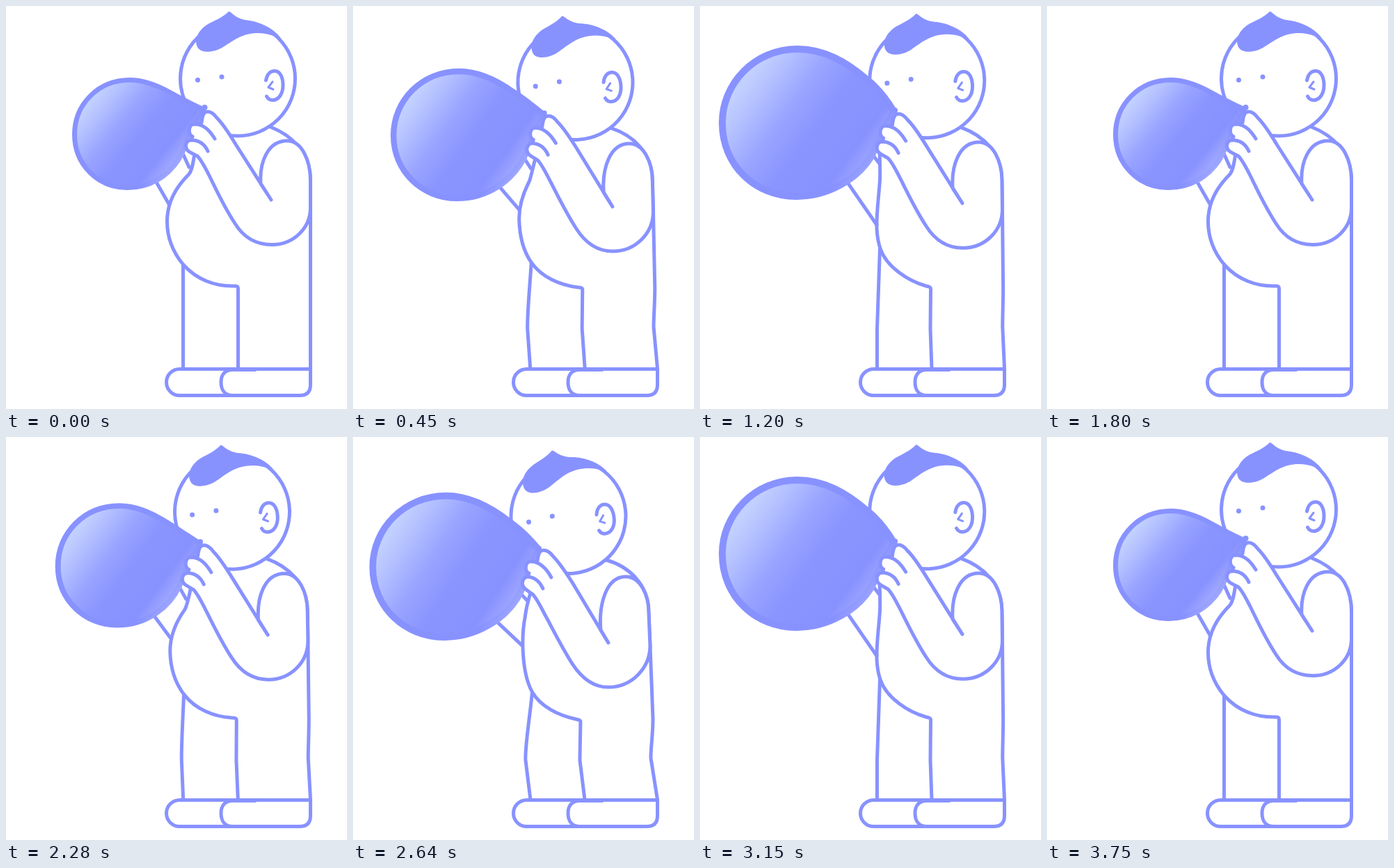
Write an HTML page that moves like this. It is 490 px wide and 580 px high and loops after 3930 ms.

```html
<!DOCTYPE html>
<html lang="en">
<head>
<meta charset="utf-8">
<title>Balloon breath</title>
<style>
  html, body { margin: 0; width: 100%; height: 100%; overflow: hidden; background: #fff; }
  svg { display: block; width: 490px; height: 580px; }
  .line { fill: none; stroke: #8892ff; stroke-width: 5; stroke-linecap: round; stroke-linejoin: round; }
  .solid { fill: #8892ff; }
  .white { fill: #fff; }
</style>
</head>
<body>
<svg viewBox="0 0 490 580">
  <defs>
    <linearGradient id="shine" gradientUnits="userSpaceOnUse">
      <stop offset="0" stop-color="#c1d0ff"/>
      <stop offset=".12" stop-color="#b4c1ff"/>
      <stop offset=".33" stop-color="#98a4ff"/>
      <stop offset=".52" stop-color="#8b95ff"/>
      <stop offset=".8" stop-color="#8892ff"/>
      <stop offset="1" stop-color="#abb3ff"/>
    </linearGradient>
    <linearGradient id="rim" gradientUnits="userSpaceOnUse">
      <stop offset=".84" stop-color="#8892ff"/>
      <stop offset="1" stop-color="#a3acff"/>
    </linearGradient>
  </defs>

  <g class="line">
    <path id="backArm"/>
    <path id="belly"/>
    <path id="backLeg"/>
    <path id="side"/>
    <path class="white" d="M437.5 522.5H249.5A19 19 0 0 0 249.5 560.5H422Q437.5 560.5 437.5 545Z"/>
    <path d="M358 523.5H326C315 523.5 309 530 309 541.5C309 553 315 560.5 326 560.5"/>
  </g>

  <g class="head">
    <circle class="line white" style="fill:#fff" cx="333" cy="104.5" r="82.5"/>
    <path class="solid" d="M320 8C312 16 302 20 292 25C276 34 270 48 275 59C280 69 300 67 312 59C328 49 340 39 362 39C378 39 388 44 396 50L394 45C385 33 365 22 345 20.5C336 19 328 14 324 10Q320 7 320 8Z"/>
    <path class="line" d="M373.5 107C375 98 380 93.5 386 93.5C394 93.5 398 103 398 114C398 126 392 135.5 383 135.5C379 135.5 376 133 374.5 130"/>
    <path class="line" style="stroke-width:3" d="M383 109L377 117L384 120"/>
    <g id="eyes" class="solid">
      <circle cx="275.5" cy="106.5" r="3.5"/>
      <circle cx="310" cy="102" r="3.5"/>
    </g>
  </g>

  <path id="balloon" fill="url(#shine)" stroke="url(#rim)" stroke-linejoin="round"/>
  <g class="head"><circle class="solid" cx="285.5" cy="146" r="4"/></g>

  <g class="line">
    <path id="arm" class="white" style="fill:#fff"/>
    <path id="fingers"/>
  </g>
</svg>

<script>
const $ = id => document.getElementById(id);

// Each shape: at rest, leaning and blowing, full balloon with little lean.
const shapes = {
  balloon: [
    'M282 148C262 139 250 132 235 124C215 113 197 106.5 178 106.5C132 106.5 98.5 142 98.5 185C98.5 229 133 261.5 174 261.5C215 261.5 244 236 256 205C261 190 268 172 284 152Z',
    'M266 161C252 144 240 133 226 123C197 100 166 84.8 134 84.8C74 84.8 28.8 132 28.8 187C28.8 245 75 288 131 288C178 288 217 262 236 232C248 212 253 190 266 164Z',
    'M278 151C266 131 254 117 240 106C210 80 178 62 140 62C78 62 32 112 32 168C32 230 80 274 138 274C186 274 226 248 245 218C256 198 262 180 278 154Z'
  ],
  belly: [
    'M271 212C269 226 267 238 262 243C247 258 231.5 280 231.5 310C231.5 330 238 352 254.5 372C274 394 300 403 325 403L330 403Q333.5 403 333.5 407L333.5 465L333.5 522',
    'M256 222C252 234 249 245 247.5 258C244 275 243.5 290 244 305C245 330 249 352 257.5 367C270 389 297 401 320 406L324 407Q327 408 327 409L326 465L333 522',
    'M258 208C258.5 222 259 236 258.5 250C257 275 253.5 295 254 320C254.5 330 256 340 259 349C268 376 300 396 325 403L329 404Q331.5 405 331.5 407L331 465L333 522'
  ],
  backLeg: [
    'M254.5 372C254.5 400 254.5 440 254.5 465L254.5 522',
    'M257.5 367C254 405 247 445 248 465L255 522',
    'M258.5 349C257 390 255.5 440 254.5 465L254.5 522'
  ],
  backArm: [
    'M254 212L263 232M214 250L234 285',
    'M240 224L250 235M205 264L243 300',
    'M248 214L258 227M212 254L254 315'
  ],
  side: [
    'M380 174C410 186 437 210 437.5 250L437.5 290L437.5 405C437.5 430 437.5 445 437.5 462L437.5 522',
    'M364 177C396 186 425 212 425 252L427 300L431 405C431 430 428 445 428 462L437.5 522'
  ],
  arm: [
    'M281 168C282 160 283 152 290 152C296 152 300 157 303 161C311 169 321 184 330 199L381 279L366 256C364 225 376 194 404 194C425 194 437 222 437.5 250L437.5 290C437.5 320 413 343.5 382 343.5C360 343.5 342 334 329 313C312 287 300 260 292 244C286 232 281 222 275 216C268 212 264 211 261 208C256 202 259 193 266 193L268 188C261 184 262 170 271 170C276 170 279 170 281 168Z',
    'M265 179C266 171 267 163 274 163C280 163 284 167 287 171C295 179 306 195 315 209L367 296L356 278C353 240 364 201 392 201C413 201 425 228 425 252L427 300C427 333 400 360 367 360C345 360 328 346 315 326C298 299 285 272 276 256C270 244 265 234 259 227C252 222 249 220 246 217C241 211 244 202 251 201L253 196C246 193 247 179 256 179C260 179 263 180 265 179Z'
  ],
  fingers: [
    'M271 170C285 170 293 180 300 191M266 193C279 193 286 200 290 209',
    'M256 179C270 180 279 191 285 202M251 201C263 202 269 209 273 218'
  ]
};
const shineLine = ['112 150 235 250', '45 150 228 270', '50 130 235 265'];

const LEAN = 0.866, FULL_LEAN = 0.25;
const numbers = s => s.match(/[\d.]+/g).map(Number);

// Returns a function that blends the poses for a given lean and breath.
function blender(poses) {
  const [rest, blow, full] = poses.map(numbers);
  return (lean, breath) => {
    const f = full ? (breath - lean) / (1 - FULL_LEAN) : 0;
    const w = (lean - FULL_LEAN * f) / LEAN;
    return rest.map((n, i) => n + w * (blow[i] - n) + (full ? f * (full[i] - n) : 0));
  };
}

const parts = Object.entries(shapes).map(([id, poses]) => {
  const blend = blender(poses), node = $(id);
  return (lean, breath) => {
    const v = blend(lean, breath);
    let i = 0;
    node.setAttribute('d', poses[0].replace(/[\d.]+/g, () => v[i++].toFixed(2)));
  };
});
const shineAt = blender(shineLine);
const heads = document.querySelectorAll('.head');

const clamp = x => Math.min(1, Math.max(0, x));
const ease = (t, from, to) => 0.5 - 0.5 * Math.cos(Math.PI * clamp((t - from) / (to - from)));

function draw(t) {
  const rise = ease(t, 0, 900);
  const lean = rise - ease(t, 900, 1350);
  const breath = rise - ease(t, 1200, 1800);

  parts.forEach(part => part(lean, breath));
  heads.forEach(g => g.setAttribute('transform',
    `translate(${-27 * lean} ${10.8 * lean}) rotate(${-7.4 * lean} 333 104.5)`));

  $('balloon').setAttribute('stroke-width', 7 + 3 * breath);
  const ends = shineAt(lean, breath);
  for (const id of ['shine', 'rim'])
    ['x1', 'y1', 'x2', 'y2'].forEach((k, i) => $(id).setAttribute(k, ends[i]));
}

const LOOP = 3930, STEP = 30, BREATH = 1950;
const BLINK = [3090, 3210]; // once per loop, during the second breath
const start = performance.now();
function tick() {
  const t = Math.floor(((performance.now() - start) % LOOP) / STEP) * STEP;
  draw(t < BREATH + STEP ? t : t - BREATH);
  const shut = t >= BLINK[0] && t < BLINK[1];
  $('eyes').setAttribute('visibility', shut ? 'hidden' : 'visible');
  requestAnimationFrame(tick);
}
tick();
</script>
</body>
</html>
```
